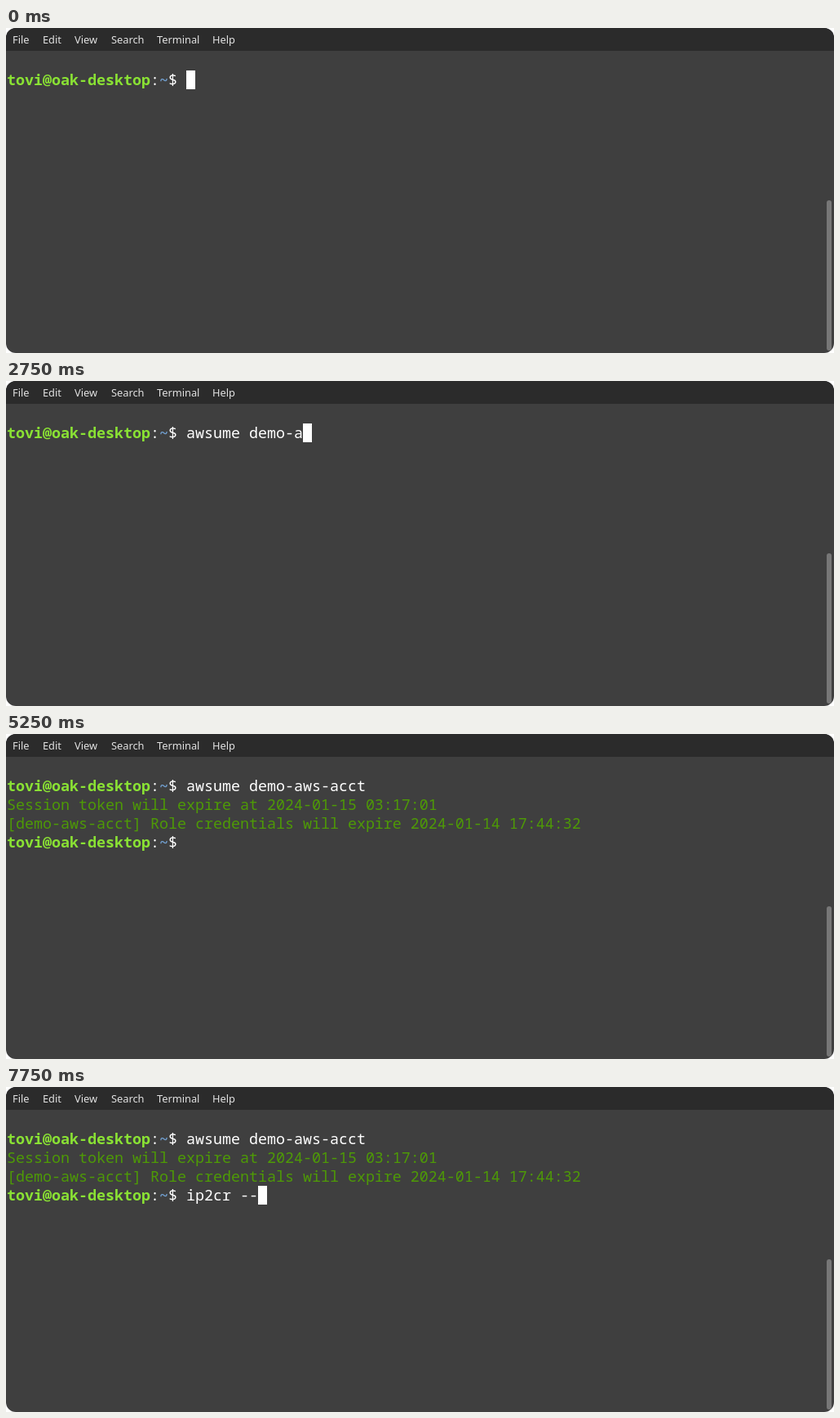
Animation, 1015 px wide and 398 px high, one loop 8 s. Source, as an HTML page:

```html
<!DOCTYPE html>
<html lang="en">
<head>
<meta charset="utf-8">
<title>Terminal</title>
<style>
html, body { margin: 0; width: 100%; height: 100%; overflow: hidden; background: #fff; }
#window { position: relative; width: 1015px; height: 398px; border-radius: 12px; overflow: hidden; background: #3f3f3f; }
#menu { height: 28px; background: #2b2b2b; color: #e2e2e2; font: 12.8px/28px "Noto Sans", "Open Sans", sans-serif; }
#menu span { position: absolute; top: 0; }
#screen { position: absolute; left: 1px; top: 51px; margin: 0; color: #fff; font: 18.333px/23px "Noto Sans Mono", monospace; font-variant-ligatures: none; }
#cursor { position: absolute; width: 11px; height: 23px; background: #fff; }
#scroll { position: absolute; left: 1006px; top: 211px; width: 6px; height: 184px; border-radius: 3px; background: #777; }
b { font-weight: 600; }
.user { color: #8ae234; }
.path { color: #729fcf; }
.info { color: #4e9a06; }
</style>
</head>
<body>
<div id="window">
  <div id="menu">
    <span style="left:8px">File</span><span style="left:45px">Edit</span><span style="left:84px">View</span>
    <span style="left:129px">Search</span><span style="left:185px">Terminal</span><span style="left:253px">Help</span>
  </div>
  <pre id="screen"></pre>
  <div id="cursor"></div>
  <div id="scroll"></div>
</div>
<script>
const LOOP = 8000, TICK = 250, CELL = 11, ROW = 23, PROMPT = 20;
const prompt = '<b class="user">tovi@oak-desktop</b>:<b class="path">~</b>$ ';
const info = text => `<span class="info">${text}</span>`;
const session = info('Session token will expire at 2024-01-15 03:17:01');
const role = info('[demo-aws-acct] Role credentials will expire 2024-01-14 17:44:32');
const login = 'awsume demo-aws-acct', command = 'ip2cr --';

// Characters typed at each tick
const loginKeys = [0, 1, 2, 4, 5, 6, 7, 9, 10, 11, 12, 13, 14, 16, 17, 19, 20];
const commandKeys = [0, 0, 0, 1, 2, 3, 4, 5, 6, 7, 8];
const hiddenTicks = [18, 20, 21, 23];

const screen = document.getElementById('screen');
const cursor = document.getElementById('cursor');
let shown = -1;

function draw(tick) {
  const lines = [prompt + login.slice(0, loginKeys[tick])];
  let row = 0, col = PROMPT + loginKeys[tick];
  if (tick > 16) { row = 1; col = 0; }
  if (tick > 18) { row = 2; lines.push(session); }
  if (tick > 20) {
    const typed = commandKeys[tick - 21];
    row = 3;
    col = PROMPT + typed;
    lines.push(role, prompt + command.slice(0, typed));
  }
  screen.innerHTML = lines.join('\n');
  cursor.style.left = 1 + col * CELL + 'px';
  cursor.style.top = 52 + row * ROW + 'px';
  cursor.hidden = hiddenTicks.includes(tick);
}

function frame() {
  const tick = Math.floor(performance.now() % LOOP / TICK);
  if (tick !== shown) draw(shown = tick);
  requestAnimationFrame(frame);
}
frame();
</script>
</body>
</html>
```
